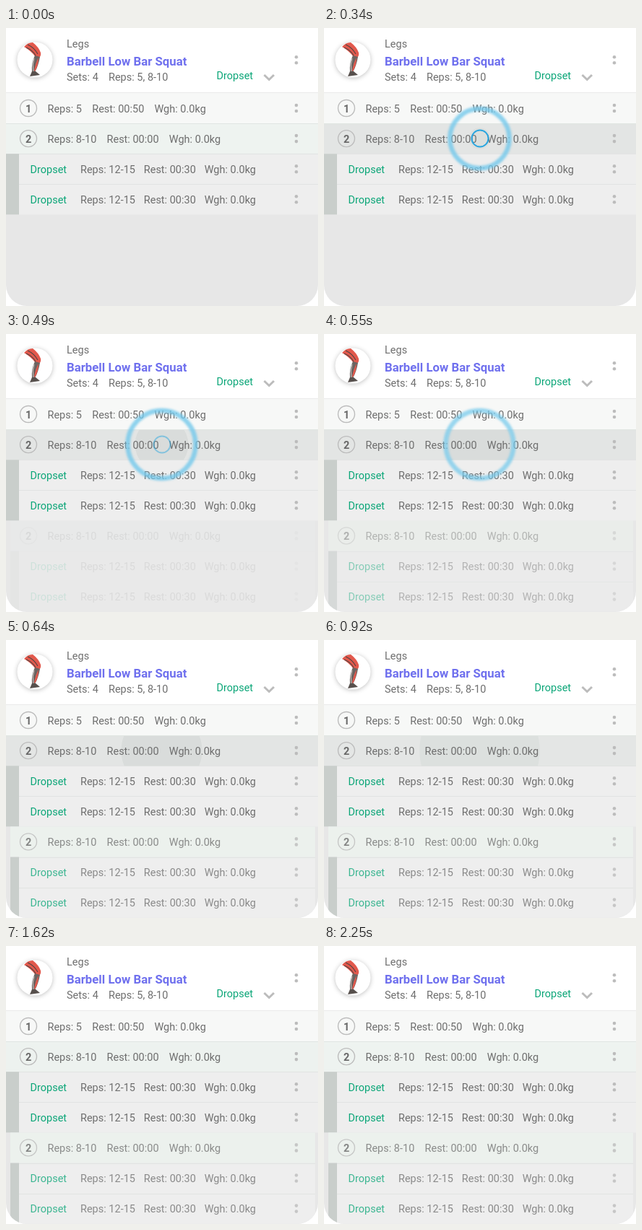
Write an HTML page with a canvas that moves like this. It is 432 px wide and 385 px high and loops after 2.32 s.

```html
<!DOCTYPE html>
<html lang="en">
<head>
<meta charset="utf-8">
<title>Dropset list</title>
<style>
html, body { margin: 0; width: 100%; height: 100%; overflow: hidden; background: #fff }
canvas { display: block }
</style>
</head>
<body>
<canvas id="stage" width="432" height="385"></canvas>
<script>
const c = document.getElementById('stage').getContext('2d');
const LOOP = 2320, W = 432, H = 385, ROW = 42.1, TOP = 90;
const GREY = '#6e6e6e', GREEN = '#0ca678', PALE = '#bcbcbc';
const TOUCH = { x: 215.5, y: 153 };

// Progress from 0 to 1 between times a and b
const part = (t, a, b) => Math.min(1, Math.max(0, (t - a) / (b - a)));
const smooth = p => p * p * (3 - 2 * p);
const easeOut = p => 1 - (1 - p) ** 2;
const rowY = i => TOP + i * ROW;

function rect(x, y, w, h, color) {
  c.fillStyle = color;
  c.fillRect(x, y, w, h);
}

// Draws the text and returns its right edge
function text(s, x, y, color = GREY, size = 14.5, weight = 400) {
  c.font = `${weight} ${size}px Roboto, sans-serif`;
  c.fillStyle = color;
  c.fillText(s, x, y);
  return x + c.measureText(s).width;
}

function texts(list, x, y, gap) {
  for (const s of list) x = text(s, x, y) + gap;
}

function disc(x, y, r, color) {
  c.fillStyle = color;
  c.beginPath();
  c.arc(x, y, r, 0, 7);
  c.fill();
}

function ring(x, y, r, width, color) {
  c.strokeStyle = color;
  c.lineWidth = width;
  c.beginPath();
  c.arc(x, y, r, 0, 7);
  c.stroke();
}

function line(d, color, width) {
  c.strokeStyle = color;
  c.lineWidth = width;
  c.stroke(new Path2D(d));
}

function shape(d, color) {
  c.fillStyle = color;
  c.fill(new Path2D(d));
}

function dots(y) {
  disc(402, y - 4, 2.3, PALE);
  disc(402, y + 4, 2.3, PALE);
}

function setRow(i, n, ...labels) {
  const y = rowY(i) + 21;
  ring(31, y, 11.5, 1.4, PALE);
  text(n, 26.9, y + 5.5, '#686868', 14.5, 700);
  texts(labels, 57.5, y + 5.5, 14.2);
  dots(y);
}

function dropRow(i) {
  const y = rowY(i) + 21;
  text('Dropset', 33.5, y + 5.5, GREEN);
  texts(['Reps: 12-15', 'Rest: 00:30', 'Wgh: 0.0kg'], 103, y + 5.5, 11.8);
  dots(y);
}

// Background of a set starting at row i with its two dropsets
function blockBase(i, left, right, color) {
  const w = right - left, y = rowY(i), drops = rowY(i + 1);
  rect(left, y, w, ROW, color);
  rect(left, drops, w, 2 * ROW, '#eeeeee');
  rect(left, drops, 18 - left, 2 * ROW, '#c9cecb');
  for (const k of [1, 2]) rect(18, Math.round(rowY(i + k)), right - 18, 1, '#e1e3e2');
}

function blockText(i) {
  setRow(i, '2', 'Reps: 8-10', 'Rest: 00:00', 'Wgh: 0.0kg');
  dropRow(i + 1);
  dropRow(i + 2);
}

function leg() {
  c.save();
  c.shadowColor = 'rgba(0,0,0,.25)';
  c.shadowBlur = 6;
  c.shadowOffsetY = 1;
  disc(40, 44, 24.5, '#fff');
  c.restore();
  shape('M25 26Q30 20 37 20Q45 26 48 34Q49 38 46 41L40 39Q35 32 25 26Z', '#e2584c');
  shape('M40 38L47 40Q45 52 40 61L36 61Q35 48 40 38Z', '#6b6461');
  shape('M45 41Q45 52 40 60L39 59Q41 48 45 41Z', '#e2584c');
  shape('M36 60L41 60L47 65L33 67Z', '#57504d');
  line('M30 23Q39 27 44 36M28 27Q37 31 41 38', '#4f4543', 1.1);
  line('M39 42Q36 51 38 60', '#cfc9c6', 1);
}

function header() {
  rect(0, 0, W, TOP, '#fff');
  rect(0, TOP - 1, W, 1, '#eaeaea');
  leg();
  text('Legs', 84, 27);
  text('Barbell Low Bar Squat', 84, 52, '#6f70ee', 16.8, 700);
  texts(['Sets: 4', 'Reps: 5, 8-10'], 84, 72.5, 14.2);
  text('Dropset', 291.5, 71.3, GREEN);
  line('M357.5 65L364.3 71.5L371 65', PALE, 3);
  dots(44.3);
}

// Pressed tint of the row, with a spreading circle inside it
function ripple(t) {
  const tint = smooth(part(t, 130, 330)) * (1 - smooth(part(t, 650, 1900)));
  const glow = .055 * part(t, 200, 400) * (1 - part(t, 640, 1600));
  c.save();
  c.beginPath();
  c.rect(0, rowY(1), W, ROW);
  c.clip();
  rect(0, rowY(1), W, ROW, `rgba(227,229,228,${tint})`);
  disc(TOUCH.x, TOUCH.y, 106 * easeOut(part(t, 250, 1500)), `rgba(40,75,52,${glow})`);
  c.restore();
}

function touch(t) {
  c.save();
  c.globalAlpha = .8 * part(t, 110, 190) * (1 - part(t, 545, 610));
  c.filter = 'blur(1.4px)';
  ring(TOUCH.x, TOUCH.y, 12 + 35 * easeOut(part(t, 110, 500)), 6.5, '#74c9ec');
  c.restore();
  c.save();
  c.globalAlpha = part(t, 70, 150) * (1 - part(t, 450, 530));
  ring(TOUCH.x + .5, TOUCH.y, 11.5, 2, '#2ba6df');
  c.restore();
}

function draw(t) {
  c.clearRect(0, 0, W, H);
  c.save();
  c.beginPath();
  c.roundRect(0, -40, W, H + 40, 29);
  c.clip();
  rect(0, 0, W, H, '#e7e7e7');
  header();

  rect(0, TOP, W, ROW, '#f7f8f7');
  setRow(0, '1', 'Reps: 5', 'Rest: 00:50', 'Wgh: 0.0kg');
  blockBase(1, 0, W, '#eef3f0');
  ripple(t);
  rect(0, 132, W, 1, '#e0e5e2');
  blockText(1);

  // The copied block fades in below
  const copy = part(t, 470, 610);
  c.globalAlpha = copy;
  blockBase(4, 6, 428, '#ecf1ed');
  c.globalAlpha = copy * .78;
  blockText(4);
  c.globalAlpha = 1;

  touch(t);
  c.restore();
}

function tick() {
  draw(performance.now() % LOOP);
  requestAnimationFrame(tick);
}
tick();
</script>
</body>
</html>
```
